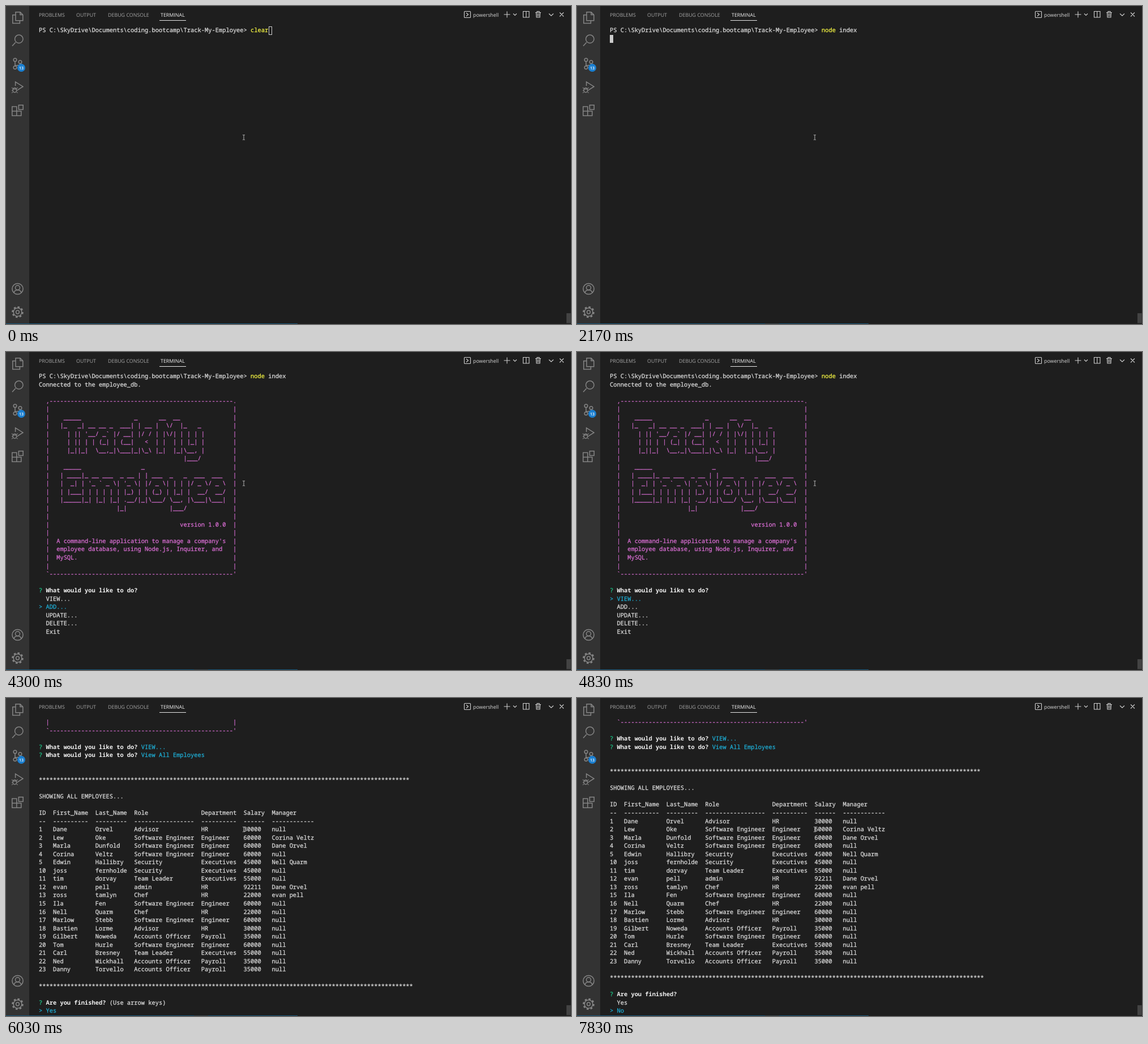
An HTML page that plays this animation: 998 by 561 pixels, repeating every 8 s.

```html
<!DOCTYPE html>
<html lang="en">
<head>
<meta charset="utf-8">
<title>Terminal session</title>
<style>
  html, body { margin: 0; width: 100%; height: 100%; overflow: hidden; background: #1e1e1e; }
  svg, pre { position: absolute; left: 0; top: 0; margin: 0; }
  svg text { font: 8.9px "Open Sans", "Noto Sans", sans-serif; text-rendering: geometricPrecision; }
  pre {
    left: 58px; top: 36px; color: #dedede; text-rendering: geometricPrecision;
    font: 10.4px/14.54px "Noto Sans Mono", "DejaVu Sans Mono", monospace;
    font-variant-ligatures: none; -webkit-text-stroke: .25px;
  }
  #cursor { position: absolute; box-sizing: border-box; width: 6.24px; height: 14.54px; border: 1px solid #ccc; }
  .yellow { color: #f5f543 }
  .pink { color: #dc6fd6 }
  .green { color: #1cc98a }
  .cyan { color: #1fb0d8 }
  .bold { color: #f0f0f0; font-weight: bold; -webkit-text-stroke: 0 }
</style>
</head>
<body>
<svg width="998" height="561" viewBox="0 0 998 561" fill="none">
  <rect width="41" height="561" fill="#333"/>
  <g stroke="#858585" stroke-width="1.5">
    <path d="M17 10.8h8l4.8 4.8v10.2H17zM25 10.8v4.8h4.8M17 15.8h-5.2v14.6h12.6v-4.6"/>
    <path d="M16.8 64.2L11 70.5"/><circle cx="22.8" cy="58.2" r="7.2"/>
    <circle cx="16" cy="95" r="2.8"/><circle cx="25" cy="98.8" r="2.8"/><circle cx="16" cy="108.6" r="2.8"/>
    <path d="M16 98v8M25 102q0 3-9 3"/>
    <path d="M16.6 141v-7.2l13.4 8.4-9.4 6"/><ellipse cx="15.4" cy="148.4" rx="3.3" ry="4"/>
    <path d="M10 144l2.4 1.6M20.8 144l-2.4 1.6M10 149h2M19 149h2M10 153.4l2.4-1.8M20.8 153.4l-2.4-1.8M12 146.6h7" stroke-width="1.1"/>
    <path d="M10.8 177.4h8v16.2h-8zM10.8 185.5h16v8.1h-8M26.8 185.5v8.1"/><rect x="22.4" y="174.8" width="7.8" height="7.8"/>
    <circle cx="20.5" cy="499" r="9.6"/><circle cx="20.5" cy="497" r="4"/><path d="M14 506q1-5 6.5-5t6.5 5"/>
    <circle cx="20.5" cy="540" r="7.3"/><circle cx="20.5" cy="540" r="2.9"/>
    <circle cx="20.5" cy="540" r="8.9" pathLength="16" stroke-dasharray="1" stroke-width="2.8"/>
  </g>
  <circle cx="27" cy="109" r="7" fill="#1b7fd0"/>
  <text x="27" y="111.6" text-anchor="middle" fill="#fff" style="font-size:7px;font-weight:600">13</text>
  <g fill="#a6a6a6">
    <text x="58" y="18.5">PROBLEMS</text>
    <text x="124" y="18.5">OUTPUT</text>
    <text x="180" y="18.5">DEBUG CONSOLE</text>
    <text x="273" y="18.5" fill="#f4f4f4">TERMINAL</text>
    <text x="825" y="18.5" fill="#dadada">powershell</text>
  </g>
  <path d="M271 25.5h47" stroke="#e7e7e7"/>
  <g stroke="#cfcfcf" stroke-width="1.1">
    <rect x="809.5" y="9.5" width="11" height="11" rx="1"/><path d="M813 12l3.5 3-3.5 3"/>
    <path d="M879.5 15h11M885 9.5v11M896 13.5l3 3 3-3"/>
    <path d="M913.5 9.5h10.5v10.5h-10.5zM918.8 9.5v10.5"/>
    <path d="M935 11.5h10M938 11.5v-2h4v2M936.5 11.5l.5 8.5h6l.5-8.5M938.8 13v5.5M941.2 13v5.5"/>
    <path d="M959 13.5l4 3.7 4-3.7M978 11.5l7 7M985 11.5l-7 7"/>
  </g>
  <rect x="990" y="542" width="7.5" height="17.5" fill="#434343"/>
  <path d="M0 560.5h515" stroke="#18587c"/>
  <path id="notch" d="M332 560.5h25" stroke="#3c4a52"/>
</svg>
<pre id="screen"></pre>
<svg width="998" height="561" fill="none" stroke="#c8c8c8">
  <path d="M418 227.5h1.5l.5.5.5-.5h1.5M420 228v7.5M418 236h1.5l.5-.5.5.5h1.5" stroke-width=".9"/>
</svg>

<script type="text/plain" id="art">

    _____               _      __  __
   |_   _| __ __ _  ___| | __ |  \/  |_   _
     | || '__/ _` |/ __| |/ / | |\/| | | | |
     | || | | (_| | (__|   <  | |  | | |_| |
     |_||_|  \__,_|\___|_|\_\ |_|  |_|\__, |
                                      |___/
    _____                 _
   | ____|_ __ ___  _ __ | | ___  _   _  ___  ___
   |  _| | '_ ` _ \| '_ \| |/ _ \| | | |/ _ \/ _ \
   | |___| | | | | | |_) | | (_) | |_| |  __/  __/
   |_____|_| |_| |_| .__/|_|\___/ \__, |\___|\___|
                   |_|            |___/

                                     version 1.0.0

  A command-line application to manage a company's
  employee database, using Node.js, Inquirer, and
  MySQL.

</script>
<script type="text/plain" id="staff">
ID|First_Name|Last_Name|Role|Department|Salary|Manager
1|Dane|Orvel|Advisor|HR|30000
2|Lew|Oke|Software Engineer|Engineer|60000|Corina Veltz
3|Marla|Dunfold|Software Engineer|Engineer|60000|Dane Orvel
4|Corina|Veltz|Software Engineer|Engineer|60000
5|Edwin|Hallibry|Security|Executives|45000|Nell Quarm
10|joss|fernholde|Security|Executives|45000
11|tim|dorvay|Team Leader|Executives|55000
12|evan|pell|admin|HR|92211|Dane Orvel
13|ross|tamlyn|Chef|HR|22000|evan pell
15|Ila|Fen|Software Engineer|Engineer|60000
16|Nell|Quarm|Chef|HR|22000
17|Marlow|Stebb|Software Engineer|Engineer|60000
18|Bastien|Lorme|Advisor|HR|30000
19|Gilbert|Noweda|Accounts Officer|Payroll|35000
20|Tom|Hurle|Software Engineer|Engineer|60000
21|Carl|Bresney|Team Leader|Executives|55000
22|Ned|Wickhall|Accounts Officer|Payroll|35000
23|Danny|Torvello|Accounts Officer|Payroll|35000
</script>
<script>
const LOOP = 8000, ROWS = 36, CELL_W = 6.24, CELL_H = 14.54;
const screenEl = document.getElementById('screen');
const notch = document.getElementById('notch');
const textOf = id => document.getElementById(id).textContent;

const paint = (style, text) => `<span class="${style}">${text.replace(/</g, '&lt;')}</span>`;
const pink = text => paint('pink', text);
const cyan = text => paint('cyan', text);

// Terminal content
const prompt = 'PS C:\\SkyDrive\\Documents\\coding.bootcamp\\Track-My-Employee> ';
const cleared = [prompt + paint('yellow', 'clear')];
const started = [prompt + paint('yellow', 'node') + ' index'];
const connected = [...started, 'Connected to the employee_db.'];

const rule = '-'.repeat(52);
const art = textOf('art').slice(1, -1).split('\n');
const intro = [
  ...connected, '',
  pink(`  ,${rule}.`),
  ...art.map(line => pink(`  |${line.padEnd(52)}|`)),
  pink(`  \`${rule}'`), ''
];

const ask = (question, answer = '') => `${paint('green', '?')} ${paint('bold', question)} ${answer}`;
const options = (items, selected) =>
  items.map((item, i) => i === selected ? cyan('> ' + item) : '  ' + item);

const hint = '(Use arrow keys)';
const what = 'What would you like to do?';
const mainMenu = (selected, note) => [
  ...intro, ask(what, note),
  ...options(['VIEW...', 'ADD...', 'UPDATE...', 'DELETE...', 'Exit'], selected)
];
const viewing = [...intro, ask(what, cyan('VIEW...'))];
const viewMenu = [
  ...viewing, ask(what, hint),
  ...options(['View All Employees', 'View All Roles', 'View All Departments', 'View Employee by Manager',
    'View Employees by Department', 'View Budget Total for Each Department', 'Go back'], 0)
];

const widths = [2, 10, 9, 17, 10, 6, 12];
const tableRow = cells => widths.map((w, i) => (cells[i] || 'null').padEnd(w)).join('  ');
const [header, ...people] = textOf('staff').trim().split('\n').map(line => tableRow(line.split('|')));
const table = [
  ...viewing, ask(what, cyan('View All Employees')), '', '',
  '*'.repeat(105), '', 'SHOWING ALL EMPLOYEES...', '',
  header, tableRow(widths.map(w => '-'.repeat(w))), ...people, '',
  '*'.repeat(106), ''
];
const finished = (items, selected, note) =>
  [...table, ask('Are you finished?', note), ...options(items, selected)];

const cursor = (col, row, fill = '#ccc') =>
  `<i id="cursor" style="left:${col * CELL_W}px;top:${row * CELL_H}px;background:${fill}"></i>`;

// Start time, lines, cursor
const scenes = [
  [0, cleared, cursor(65, 0, 'none')],
  [500, cleared, cursor(65, 0)],
  [1230, started, cursor(70, 0)],
  [2170, started, cursor(0, 1)],
  [2970, connected, cursor(0, 2)],
  [3030, intro, cursor(0, 26)],
  [3100, mainMenu(0, hint)],
  [4300, mainMenu(1)],
  [4630, mainMenu(0)],
  [4970, viewMenu],
  [6030, finished(['Yes'], 0, hint)],
  [6100, finished(['Yes', 'No'], 0, hint)],
  [7830, finished(['Yes', 'No'], 1)]
];

let shown;
function tick() {
  const t = performance.now() % LOOP;
  const scene = scenes.findLast(([start]) => start <= t);
  if (scene !== shown) {
    const [start, lines, caret = ''] = shown = scene;
    screenEl.innerHTML = lines.slice(-ROWS).join('\n') + caret;
    notch.style.visibility = start >= 2170 ? 'visible' : 'hidden';
  }
  requestAnimationFrame(tick);
}
tick();
</script>
</body>
</html>
```
